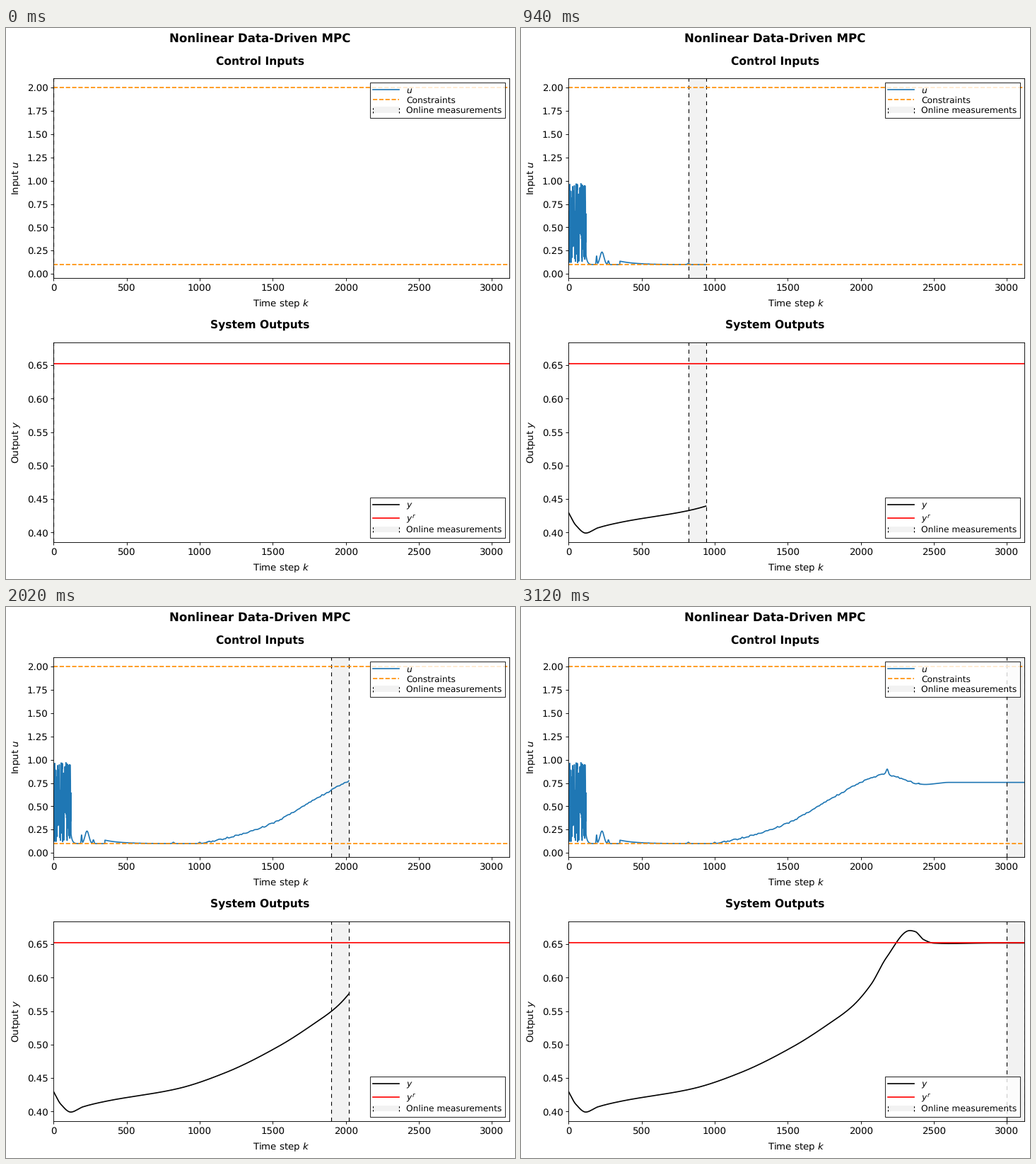
A matplotlib script for the animation above (3140 ms loop, 720x778 px).

```python
import numpy as np
import matplotlib.pyplot as plt
from matplotlib.animation import FuncAnimation
from matplotlib.legend_handler import HandlerBase
from matplotlib.lines import Line2D
from matplotlib.patches import Patch, Rectangle

W, H, DPI = 720, 778, 80
STEP, LAST, WINDOW = 20, 3120, 120
LEFT, RIGHT, AX_H = 67.2, 712.2, 281.5
U_MIN, U_MAX, Y_REF = .1, 2, .6519

plt.rcParams.update({"font.family": "DejaVu Sans", "font.size": 12,
                     "text.hinting": "none"})
rng = np.random.default_rng(11)
k = np.arange(LAST + 1)


def smooth(*points):
    """Monotone cubic curve through a few key points."""
    x, y = np.array(points, float).T
    h = np.diff(x)
    d = np.diff(y) / h
    m = np.zeros_like(x)
    m[0] = d[0]
    a, b = d[:-1], d[1:]
    same = a * b > 0
    m[1:-1][same] = 2 * a[same] * b[same] / (a + b)[same]
    i = np.clip(np.searchsorted(x, k, side="right") - 1, 0, len(h) - 1)
    s = np.clip((k - x[i]) / h[i], 0, 1)
    ease = s * s * (3 - 2 * s)
    return (y[i] + (y[i + 1] - y[i]) * ease
            + h[i] * s * (1 - s) * (m[i] * (1 - s) - m[i + 1] * s))


def bump(center, height, width):
    return height * np.exp(-((k - center) / width) ** 2)


def decay(start, height, length):
    return np.where(k < start, 0, height * np.exp((start - k) / length))


def ripple(start, end, size, spacing=11):
    knots = np.arange(0, LAST + spacing, spacing)
    noise = np.interp(k, knots, rng.uniform(-size, size, knots.size))
    return noise * ((k > start) & (k < end))


def make_input():
    u = smooth((1010, U_MIN), (1200, .166), (1380, .25), (1500, .32),
               (1800, .585), (2060, .797), (2170, .845), (2222, .826),
               (2440, .735), (2600, .757))
    u += decay(WINDOW, .1, 9) + decay(352, .037, 110)
    u += bump(192, .09, 4) + bump(229, .135, 19) + bump(273, .04, 6)
    u += bump(820, .014, 8) + bump(1000, .014, 9) + bump(2180, .06, 9)
    u += ripple(1050, 2400, .008)

    # random excitation before the controller takes over
    low = .12 + bump(34, .2, 8) + bump(82, .36, 6)
    mix = .5 - .5 * np.cos(np.pi * rng.random(k.size))
    return np.where(k < WINDOW, low + (.97 - low) * mix, u)


def make_output():
    return smooth((0, .430), (50, .411), (118, .3993), (200, .4070),
                  (360, .4155), (850, .4343), (1180, .4585), (1540, .4975),
                  (1780, .531), (1940, .557), (2070, .590), (2175, .630),
                  (2335, .6705), (2372, .669), (2430, .657), (2500, .6517),
                  (2600, .6511), (2900, Y_REF))


class SpanHandler(HandlerBase):
    def create_artists(self, legend, handle, x0, y0, w, h, size, trans):
        box = Rectangle((x0, y0), w, h, fc="gray", ec="none", alpha=.1)
        sides = [Line2D([x, x], [y0, y0 + h], color="k", lw=1,
                        ls=(0, (2.2, 2.2))) for x in (x0, x0 + w)]
        parts = [box, *sides]
        for p in parts:
            p.set_transform(trans)
        return parts


fig = plt.figure(figsize=(W / DPI, H / DPI), dpi=DPI, facecolor="white")


def label(x, y, text, **kw):
    fig.text(x / W, 1 - y / H, text, ha="center", va="baseline",
             rotation_mode="anchor", **kw)


class Panel:
    def __init__(self, top, title, ylabel, ylim, yticks, data, color):
        self.data = data
        bottom = top + AX_H
        self.ax = ax = fig.add_axes([LEFT / W, 1 - bottom / H,
                                     (RIGHT - LEFT) / W, AX_H / H])
        ax.set(xlim=(0, LAST), ylim=ylim, yticks=yticks,
               xticks=range(0, 3001, 500))
        label(W / 2 - .4, top - 19.5, title, size=14, weight="bold")
        label((LEFT + RIGHT) / 2, bottom + 40.3, "Time step $k$")
        label(18.5, top + AX_H / 2, ylabel, rotation=90)
        self.line, = ax.plot([], [], color=color, lw=1.5)
        self.span = ax.add_patch(Rectangle(
            (0, 0), 0, 1, transform=ax.get_xaxis_transform(),
            fc="gray", ec="none", alpha=.1))
        self.edges = [ax.axvline(0, color="k", lw=1, ls=(0, (5, 5)))
                      for _ in range(2)]

    def add_legend(self, name, ref, ref_name, loc):
        span = Patch()
        self.ax.legend([self.line, ref, span],
                       [name, ref_name, "Online measurements"],
                       handler_map={span: SpanHandler()}, loc=loc,
                       fontsize=11, handlelength=3, labelspacing=.2,
                       fancybox=False, edgecolor="black", framealpha=.8)

    def show(self, now):
        start = max(0, now - WINDOW)
        self.line.set_data(k[:now + 1], self.data[:now + 1])
        self.span.set_x(start)
        self.span.set_width(now - start)
        for edge, x in zip(self.edges, (start, now)):
            edge.set_xdata([x, x])


label(W / 2 - .4, 20.6, "Nonlinear Data-Driven MPC", size=15, weight="bold")

inputs = Panel(71.3, "Control Inputs", "Input $u$", (-.042, 2.097),
               np.arange(0, 2.01, .25), make_input(), "tab:blue")
limits = [inputs.ax.axhline(v, color="darkorange", lw=1.5, ls="--")
          for v in (U_MIN, U_MAX)]
inputs.add_legend("$u$", limits[0], "Constraints", "upper right")

outputs = Panel(444.3, "System Outputs", "Output $y$", (.3859, .6838),
                np.arange(.40, .66, .05), make_output(), "black")
setpoint = outputs.ax.axhline(Y_REF, color="red", lw=1.5)
outputs.add_legend("$y$", setpoint, "$y^r$", "lower right")


def update(i):
    for panel in (inputs, outputs):
        panel.show(i * STEP)
    return []


anim = FuncAnimation(fig, update, frames=LAST // STEP + 1, interval=20,
                     repeat=True, repeat_delay=0, blit=False)
plt.show()
```
